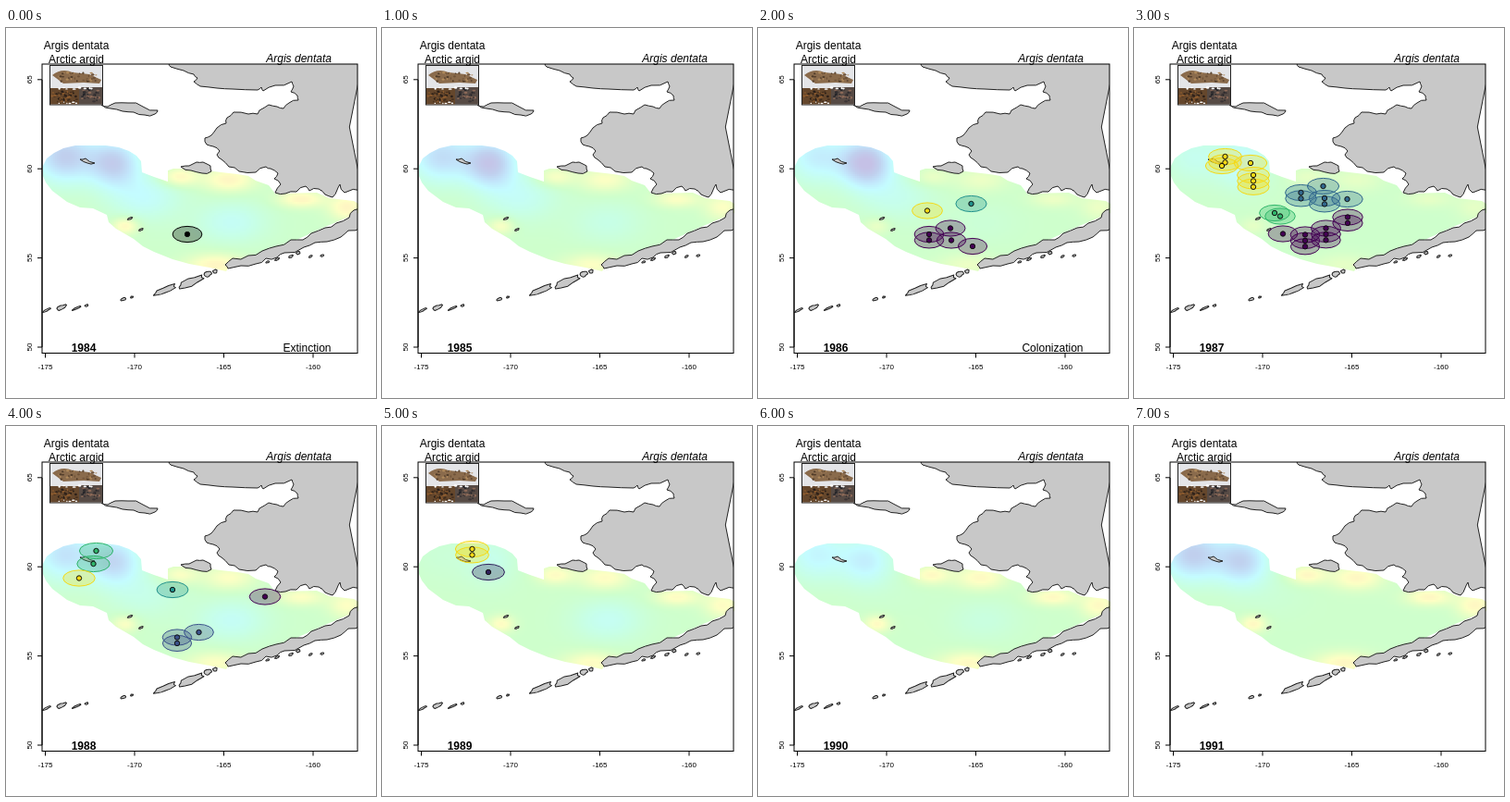
Animation of 400 by 400 pixels, one loop 8 s. Source, as an HTML page with a canvas:

```html
<!DOCTYPE html>
<html lang="en">
<head>
<meta charset="utf-8">
<title>Argis dentata survey map</title>
<style>
  html, body { margin: 0; width: 100%; height: 100%; overflow: hidden; background: #fff; }
  canvas, svg { position: absolute; left: 0; top: 0; width: 400px; height: 400px; }
  text { font-family: "Liberation Sans", Arial, Helvetica, sans-serif; font-size: 12px; fill: #000; }
  .axis text { font-size: 8px; text-anchor: middle; }
  .axis path, .axis rect { fill: none; stroke: #000; }
</style>
</head>
<body>
<canvas id="field" width="400" height="400"></canvas>
<svg viewBox="0 0 400 400">
  <defs><clipPath id="frame"><rect x="39" y="39" width="341" height="312.5"/></clipPath></defs>
  <g id="land" clip-path="url(#frame)" fill="#c8c8c8" stroke="#222" stroke-linejoin="round"></g>

  <!-- specimen picture -->
  <rect x="47.5" y="40.5" width="57" height="42.5" fill="#e4e5e8" stroke="#222"/>
  <path d="M50 51Q60 43 72 48L90 50 103 56 101 60 84 59 62 60Z" fill="#8a6b4c"/>
  <path d="M48 65H79V82.5H48Z" fill="#65472c"/>
  <path d="M79 64H104V82.5H79Z" fill="#574b45"/>
  <g id="specks"></g>

  <g id="spots"></g>
  <g id="axis" class="axis"><rect x="39" y="39" width="341" height="312.5"/></g>

  <text x="76" y="23" text-anchor="middle">Argis dentata</text>
  <text x="76" y="38" text-anchor="middle">Arctic argid</text>
  <text x="352" y="37" text-anchor="end" font-style="italic">Argis dentata</text>
  <text id="year" x="84" y="350" text-anchor="middle" font-weight="bold"></text>
  <text id="label" x="351.5" y="350" text-anchor="end"></text>
</svg>

<script>
const $ = id => document.getElementById(id);
const ctx = $("field").getContext("2d");

function add(parent, tag, attrs, text = "") {
  const el = document.createElementNS("http://www.w3.org/2000/svg", tag);
  for (const k in attrs) el.setAttribute(k, attrs[k]);
  el.textContent = text;
  parent.append(el);
}

let seed = 11;
const rand = () => (seed = seed * 16807 % 2147483647) / 2147483647;
const points = s => s.trim().split(/\s+/).map(p => p.split(",").map(Number));
const outline = pts => "M" + pts.map(p => p.map(v => v.toFixed(1))).join("L") + "Z";

// Axes: 19.3 px per degree
const axis = $("axis");
add(axis, "path", { d: "M42.5 351.5H332M39 56V345" });
for (let i = 0; i < 4; i++) {
  const x = 42.5 + i * 96.5, y = 345 - i * 96.4;
  add(axis, "path", { d: `M${x} 351.5v5M39 ${y}h-5` });
  add(axis, "text", { x, y: 369 }, -175 + i * 5);
  add(axis, "text", { transform: `translate(28 ${y}) rotate(-90)` }, 50 + i * 5);
}

// Coasts: key points, roughened by displaced midpoints
function roughen(pts) {
  return pts.flatMap(([x, y], i) => {
    const [u, v] = pts[(i + 1) % pts.length], k = (rand() - 0.5) * 0.3;
    return [[x, y], [(x + u) / 2 + (v - y) * k, (y + v) / 2 - (u - x) * k]];
  });
}

const coasts = [
  // mainland
  `176,38 178,42 192,46 203,50 207,54 203,58 210,63 228,65 245,66 272,67 276,64 278,68 291,62 309,58 311,63 308,69
   315,73 316,78 306,81 300,87 293,85 284,83 274,89 272,93 262,93 246,91 239,97 238,103 228,108 222,116 215,119
   217,126 224,128 231,133 228,137 233,142 241,150 252,155 270,156 281,150 286,152 294,157 290,163 297,169 291,178
   302,179 314,177 324,171 328,176 338,174 345,180 353,183 358,175 361,169 366,178 385,176 385,38`,
  // peninsula
  `385,192 376,197 371,205 357,211 345,216 330,222 321,229 308,229 292,236 277,241 262,246 245,249 237,256 240,260
   254,257 270,255 281,249 293,248 301,243 322,237 334,232 347,231 362,226 370,219 385,215`,
  // large islands
  "103,83 110,85 118,81 132,81 148,85 164,89 161,93 150,94 138,91 126,90 113,87",
  "189,150 198,149 206,145 213,145 221,149 222,155 212,157 200,154",
  "80,142 86,141 96,146 88,146"
];
for (const c of coasts) add($("land"), "path", { d: outline(roughen(points(c))) });

// Small islands: centre, length, width
const islands = `199,275,32,8 171,284,26,7 218,266,9,6 226,263,5,4 127,293,6,3 136,291,3,2 44,305,10,2 60,302,13,4
  76,303,10,2 87,300,4,2 283,253,4,2 293,250,5,2 308,247,5,3 316,243,5,3 329,247,4,2 342,246,4,2 134,206,5,2 146,218,5,2`;
for (const [x, y, w, h] of points(islands)) {
  const edge = Array.from({ length: 12 }, (_, i) => {
    const r = 0.35 + rand() * 0.25, a = i * Math.PI / 6;
    return [w * r * Math.cos(a), h * r * Math.sin(a)];
  });
  add($("land"), "path", { d: outline(edge), transform: `translate(${x} ${y}) rotate(-24)` });
}

function speckle(x, y, w, h, n, colours) {
  for (let i = 0; i < n; i++)
    add($("specks"), "ellipse", {
      cx: x + rand() * w, cy: y + rand() * h, rx: 0.6 + rand() * 1.4, ry: 0.5 + rand() * 0.8,
      fill: colours[i % colours.length]
    });
}
speckle(56, 48, 42, 10, 40, ["#4f3b29", "#b08a5c", "#6e5238"]);
speckle(50, 68, 27, 13, 50, ["#2c2019", "#8a5a2e", "#46301f"]);
speckle(81, 66, 21, 14, 40, ["#26262a", "#8d6a58", "#3b3435"]);
speckle(50, 64, 48, 2, 9, ["#fff"]);
speckle(57, 80, 20, 2, 6, ["#fff"]);

// Surveyed area
const area = new Path2D(outline(points(`40,160 40,149 44,141 52,135 62,130 75,127 108,127 122,129 133,133 141,138 146,144
  147,156 160,161 175,166 175,154 181,152 205,152 224,155 250,158 262,160 270,165 284,170 291,179 336,178 350,184
  376,187 381,190 381,200 345,215 312,230 284,244 243,256 238,263 220,259 198,255 180,250 160,242 148,236 138,228
  119,217 111,210 109,202 94,195 80,194 66,188 50,176 43,167`)));

// Parts of the temperature pattern: x, y, x reach, y reach
const parts = [
  [[62, 138, 32, 28]],
  [[116, 145, 28, 26]],
  [[150, 182, 38, 25]],
  [[243, 209, 38, 22]],
  [[128, 213, 14, 9], [186, 160, 20, 10], [240, 163, 28, 13], [318, 184, 25, 9], [368, 193, 20, 14], [226, 255, 32, 12]]
];

// Strength of west, northwest, middle, basin and warm rim
const strengths = {
  1984: [-4, -4, -1.8, -1.6, 2.6],
  1986: [-2.5, -5, -1.2, -0.4, 1.3],
  1987: [-1.3, -2.2, 0, 0, 1],
  1988: [-3, -3.5, -1, -1.6, 2],
  1989: [-0.4, -1.2, 0, -1.5, 2.2],
  1991: [-4, -3.7, -0.3, 0, 2.5]
};
const strengthsIn = year => strengths[year] ||
  strengths[year - 1].map((s, i) => (s + strengths[year + 1][i]) / 2);

const ramp = [[197, 193, 230], [192, 208, 238], [194, 229, 251], [196, 252, 255], [199, 255, 230],
  [206, 255, 204], [229, 255, 198], [253, 255, 196], [255, 239, 194], [255, 218, 196]];

function colour(v) {
  v = Math.max(0, Math.min(9, v));
  const i = Math.min(8, Math.floor(v));
  return `rgb(${ramp[i].map((c, k) => Math.round(c + (ramp[i + 1][k] - c) * (v - i)))})`;
}

function drawField(strength) {
  const cell = 2;
  ctx.clearRect(0, 0, 400, 400);
  ctx.save();
  ctx.clip(area);
  for (let y = 126; y < 264; y += cell)
    for (let x = 39; x < 380; x += cell) {
      let v = 5;
      parts.forEach((blobs, i) => {
        for (const [bx, by, rx, ry] of blobs)
          v += strength[i] * Math.exp(-(((x - bx) / rx) ** 2) - ((y - by) / ry) ** 2);
      });
      ctx.fillStyle = colour(v);
      ctx.fillRect(x, y, cell, cell);
    }
  ctx.restore();
}

// Stations by colour, in columns: x, top y, count
const gold = "#f5d914", green = "#2fb56a", teal = "#21918c", blue = "#31688e", indigo = "#3b528b", purple = "#440154";
const stations = {
  1984: { "#000": "196,223" },
  1986: { [gold]: "183,197.5", [teal]: "230.5,190", [purple]: "185,223,2 208,216.5 209,229.5 232,236" },
  1987: {
    [gold]: "98.5,139,2 95,149 126,146 129,159,3",
    [blue]: "180.5,178,2 204.5,171 206,184,2 230.5,185",
    [green]: "152,200 158,203.5",
    [purple]: "161,222.5 185,223.5,3 207.5,216.5,3 231,204.5,2"
  },
  1988: {
    [green]: "97.5,135 94.5,149", [gold]: "79,164.5", [teal]: "180,177",
    [indigo]: "185,228.5,2 208.5,223", [purple]: "280,184.5"
  },
  1989: { [gold]: "97.5,133,2", "#2e1e5a": "115,158" }
};
const labels = { 1984: "Extinction", 1986: "Colonization" };

function drawSpots(groups) {
  const g = $("spots");
  g.textContent = "";
  for (const fill in groups) {
    const spots = points(groups[fill]).flatMap(([x, y, n = 1]) =>
      Array.from({ length: n }, (_, i) => [x, y + i * 6.4]));
    for (const [cx, cy] of spots) {
      const lat = 60 - (cy - 152) / 19.3;
      const rx = 8.8 / Math.cos(lat * Math.PI / 180);
      add(g, "ellipse", { cx, cy, rx, ry: 8.6, fill, "fill-opacity": 0.3, stroke: fill });
    }
    for (const [cx, cy] of spots) add(g, "circle", { cx, cy, r: 2.7, fill, stroke: "#111" });
  }
}

let shown;
function render(ms) {
  const year = 1984 + Math.floor(ms % 8000 / 1000);
  if (year === shown) return;
  shown = year;
  drawField(strengthsIn(year));
  drawSpots(stations[year] || {});
  $("year").textContent = year;
  $("label").textContent = labels[year] || "";
}

let start;
function tick(now) {
  start ??= now;
  render(now - start);
  requestAnimationFrame(tick);
}
render(0);
requestAnimationFrame(tick);
</script>
</body>
</html>
```
